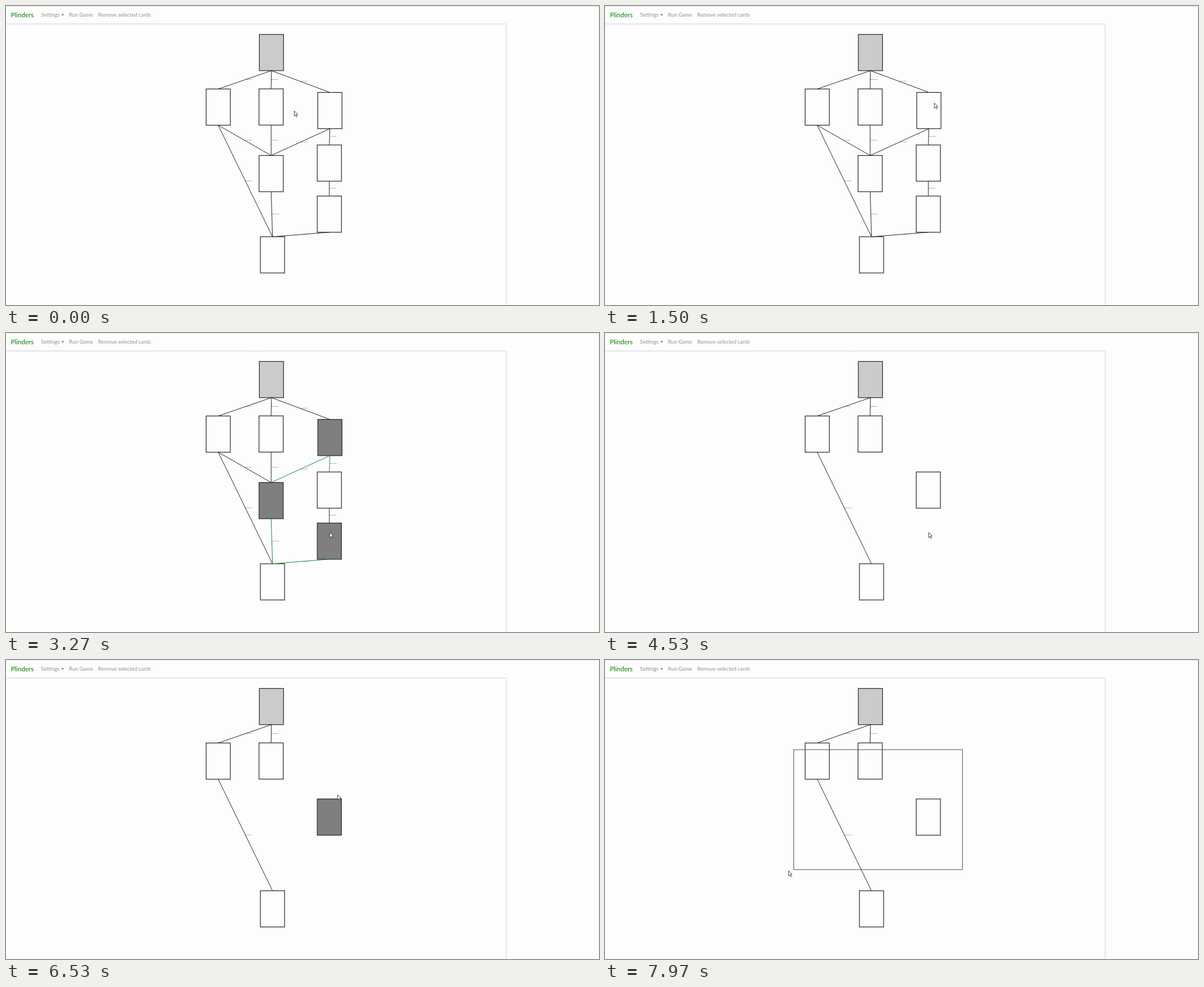
An HTML page with a canvas that plays this animation: 1054 px wide and 531 px high, repeating every 8000 ms.

```html
<!DOCTYPE html>
<html lang="en">
<head>
<meta charset="utf-8">
<title>Card graph editor</title>
<style>
  html, body { margin: 0; width: 100%; height: 100%; overflow: hidden; background: #fdfdfd; }
  canvas { display: block; }
</style>
</head>
<body>
<canvas id="stage" width="1054" height="531"></canvas>
<script>
const ctx = document.getElementById('stage').getContext('2d');
const LOOP = 8000;
const CARD_W = 43, CARD_H = 64.3;
const PAPER = '#fdfdfd', INK = '#222226', SELECTED = '#7f7f7f', GREEN = '#168a35';
const REMOVED_AT = 4200, CLEARED_AT = 7500, DRAG_AT = 7520;

// Top left corner of each card, with the time it is picked.
const cards = {
  start:  { x: 450.3, y: 50.5, fill: '#cbcbcb' },
  left:   { x: 355.7, y: 147.4 },
  middle: { x: 449.7, y: 147.2 },
  right:  { x: 554.2, y: 153.5, picked: 1560, removed: true },
  hub:    { x: 449.8, y: 265.5, picked: 2480, removed: true },
  right2: { x: 553.2, y: 246.8, picked: 5300 },
  right3: { x: 553.2, y: 337.5, picked: 3250, removed: true },
  end:    { x: 452.2, y: 409.8 }
};

const edges = [
  ['start', 'left'], ['start', 'middle'], ['start', 'right'],
  ['left', 'hub'], ['middle', 'hub'], ['right', 'hub'], ['right', 'right2'],
  ['left', 'end'], ['hub', 'end'], ['right2', 'right3'], ['right3', 'end']
];

// Keys are [time, x, y].
const pointerPath = [
  [30, 512, 186], [450, 556, 262], [830, 600, 340], [1300, 585, 172],
  [1620, 585, 172], [2270, 471, 304], [2600, 471, 304], [3100, 575, 354],
  [4750, 575, 354], [5150, 582, 285], [6430, 582, 285], [6530, 589, 239],
  [6880, 641, 62], [7260, 635, 159], [DRAG_AT, 635, 159], [7970, 326, 374]
];
const dragPath = [[DRAG_AT, 635, 159], [7970, 335, 372]];

function along(path, t) {
  const next = path.findIndex(key => key[0] > t);
  if (next === 0) return path[0].slice(1);
  if (next < 0) return path[path.length - 1].slice(1);
  const [t0, x0, y0] = path[next - 1], [t1, x1, y1] = path[next];
  const u = (t - t0) / (t1 - t0), k = u * u * (3 - 2 * u);
  return [x0 + (x1 - x0) * k, y0 + (y1 - y0) * k];
}

function strokeLine(points, color, width) {
  ctx.beginPath();
  points.forEach(([x, y]) => ctx.lineTo(x, y));
  ctx.strokeStyle = color;
  ctx.lineWidth = width;
  ctx.stroke();
}

function write(text, x, y, size, color) {
  ctx.font = `${size}px Lato, "Open Sans", sans-serif`;
  ctx.fillStyle = color;
  ctx.fillText(text, x, y);
}

function drawPage() {
  ctx.fillStyle = PAPER;
  ctx.fillRect(0, 0, 1054, 531);
  strokeLine([[0, 0.5], [1054, 0.5]], '#e9e9df', 1);
  strokeLine([[0, 32.5], [888.5, 32.5], [888.5, 531]], '#f0f0f5', 2);
  strokeLine([[0, 31.5], [889.5, 31.5], [889.5, 531]], '#dcdce6', 1);

  write('Plinders', 8.7, 19.8, 11.5, '#008000');
  write('Settings', 62.3, 19.3, 9.4, '#929292');
  write('Run Game', 112, 19.3, 9.4, '#929292');
  write('Remove selected cards', 163.8, 19.3, 9.4, '#929292');
  ctx.beginPath();
  ctx.moveTo(98, 14.5);
  ctx.lineTo(103.4, 14.5);
  ctx.lineTo(100.7, 17.2);
  ctx.fillStyle = '#777';
  ctx.fill();
}

const isGone = (card, t) => card.removed && t >= REMOVED_AT;
const isPicked = (card, t) => t >= card.picked && t < CLEARED_AT;

function drawEdge(from, to, t) {
  const x0 = from.x + CARD_W / 2, y0 = from.y + CARD_H;
  const x1 = to.x + CARD_W / 2, y1 = to.y;
  strokeLine([[x0, y0], [x1, y1]], isPicked(from, t) ? GREEN : INK, 1);
  write('Placeholder', (x0 + x1) / 2 + 0.3, (y0 + y1) / 2, 2.4, '#333');
}

function drawCard(card, t) {
  ctx.fillStyle = isPicked(card, t) ? SELECTED : card.fill || PAPER;
  ctx.strokeStyle = INK;
  ctx.lineWidth = 1.2;
  ctx.fillRect(card.x, card.y, CARD_W, CARD_H);
  ctx.strokeRect(card.x, card.y, CARD_W, CARD_H);
}

function drawDrag(t) {
  if (t < DRAG_AT) return;
  const [, x0, y0] = dragPath[0], [x, y] = along(dragPath, t);
  ctx.strokeStyle = '#4c4c46';
  ctx.lineWidth = 1;
  ctx.strokeRect(x + 0.4, y0 + 0.2, x0 - x, y - y0);
}

function drawPointer(t) {
  const [x, y] = along(pointerPath, t);
  const outline = [[0, 0], [0, 9], [2, 7.2], [3.4, 10.4], [4.9, 9.7], [3.5, 6.6], [6.3, 6.4]];
  ctx.beginPath();
  outline.forEach(([dx, dy]) => ctx.lineTo(x + 0.4 + dx, y + 0.3 + dy));
  ctx.closePath();
  ctx.fillStyle = '#fff';
  ctx.fill();
  ctx.strokeStyle = '#333';
  ctx.lineWidth = 0.9;
  ctx.stroke();
}

function render() {
  const t = performance.now() % LOOP;
  drawPage();
  for (const card of Object.values(cards)) {
    if (!isGone(card, t)) drawCard(card, t);
  }
  for (const [a, b] of edges) {
    const from = cards[a], to = cards[b];
    if (!isGone(from, t) && !isGone(to, t)) drawEdge(from, to, t);
  }
  drawDrag(t);
  drawPointer(t);
  requestAnimationFrame(render);
}
render();
</script>
</body>
</html>
```
